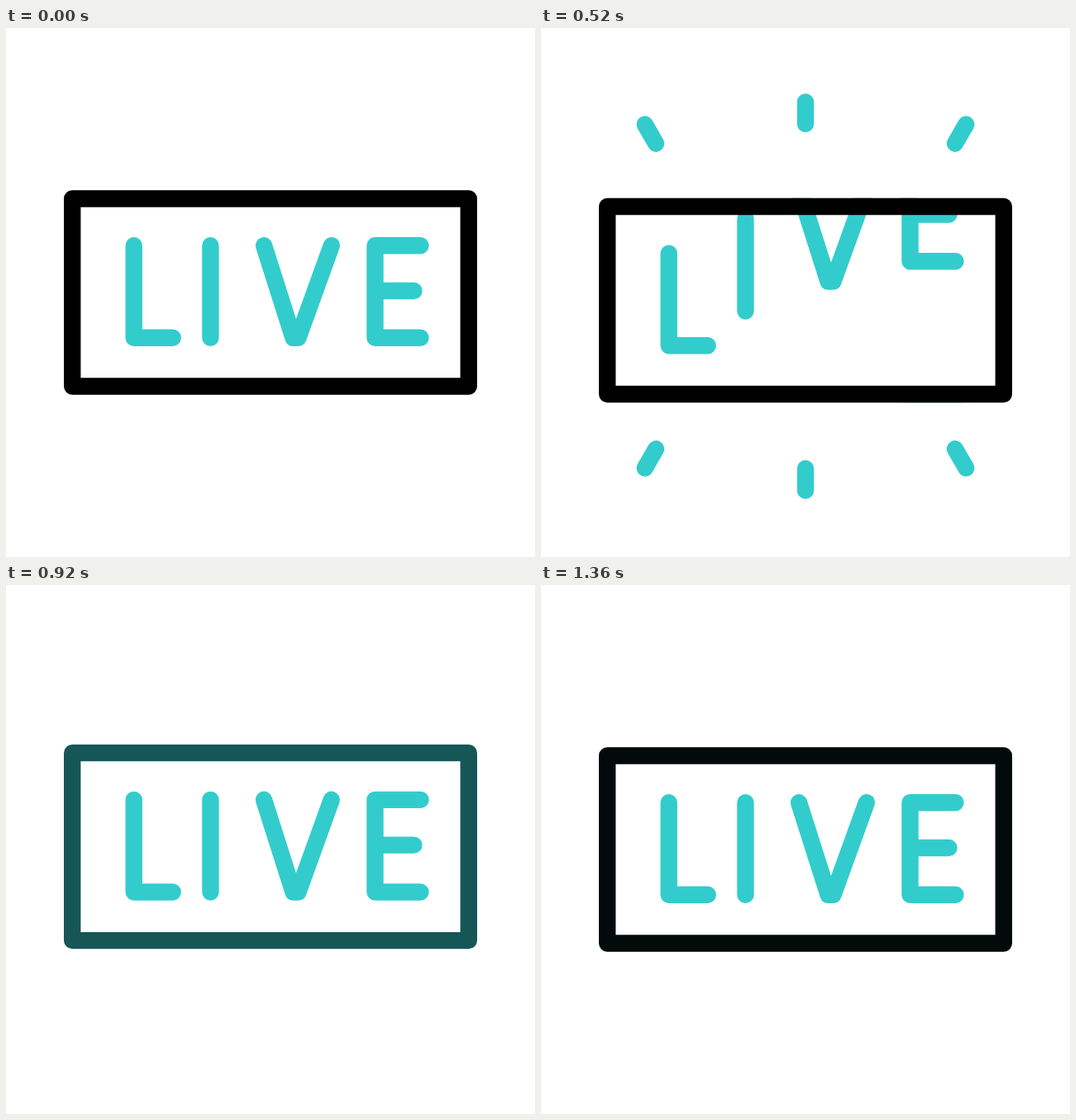
An HTML page with a canvas that plays this animation: 640 by 640 pixels, repeating every 1.48 s.

```html
<!DOCTYPE html>
<html lang="en">
<head>
<meta charset="utf-8">
<title>Live sign</title>
<style>
  html, body { margin: 0; height: 100%; overflow: hidden; background: #fff; }
  canvas { display: block; width: 100vw; height: 100vh; }
</style>
</head>
<body>
<canvas width="640" height="640"></canvas>
<script>
const ctx = document.querySelector('canvas').getContext('2d');
const LOOP = 1480, STEP = 40, LAST = 1360;
const TEAL = [51, 204, 204];
const TRAVEL = 188;

// Each letter leaves and returns at its own pace.
const letters = [
  { path: 'M154.7 263.2V374.8H201.7', out: 200, back: 200 },
  { path: 'M247.4 263.2V374.8', out: 265, back: 291 },
  { path: 'M312 263.2L347.5 374.8H353.5L393.8 263.2', out: 360, back: 360 },
  { path: 'M501.5 263.2H446.5V374.8H501.5M446.5 318H493.5', out: 440, back: 423 }
].map(l => ({ ...l, path: new Path2D(l.path) }));

// Inner end and outward direction of each ray, relative to (320, 315).
const rays = [];
for (const sy of [-1, 1]) {
  rays.push([0, sy * 194, 0, sy]);
  for (const sx of [-1, 1]) rays.push([sx * 173.7, sy * 172.2, sx * 0.5, sy * 0.866]);
}
const RAY_LENGTH = 42;

const ramp = (t, a, b) => Math.min(1, Math.max(0, (t - a) / (b - a)));
const ease = (t, a, b) => (1 - Math.cos(Math.PI * ramp(t, a, b))) / 2;

const bounce = t => 42 * ease(t, 80, 360) - 65 * ease(t, 360, 680) + 23 * ease(t, 680, 1000);
const glow = t => ramp(t, 830, 1043) - ramp(t, 1157, 1370);
const rgb = k => `rgb(${TEAL.map(c => Math.round(c * k))})`;

function drawRays(t) {
  const head = RAY_LENGTH * ease(t, 120, 560);
  const tail = RAY_LENGTH * ease(t, 360, 760);
  if (head <= tail) return;
  ctx.beginPath();
  for (const [x, y, dx, dy] of rays) {
    ctx.moveTo(320 + x + dx * tail, 315 + y + dy * tail);
    ctx.lineTo(320 + x + dx * head, 315 + y + dy * head);
  }
  ctx.stroke();
}

function drawLetter(path, shift) {
  ctx.save();
  ctx.translate(0, shift);
  ctx.stroke(path);
  ctx.restore();
}

function drawLetters(t) {
  ctx.save();
  ctx.beginPath();
  ctx.rect(70, 196.3, 500, 247.4);
  ctx.clip();
  for (const { path, out, back } of letters) {
    const leave = ease(t, 120, 120 + out);
    if (leave < 1) drawLetter(path, TRAVEL * leave);
    if (t >= 320) drawLetter(path, TRAVEL * (ease(t, 320, 320 + back) - 1));
  }
  ctx.restore();
}

function draw(t) {
  ctx.setTransform(1, 0, 0, 1, 0, 0);
  ctx.fillStyle = '#fff';
  ctx.fillRect(0, 0, 640, 640);
  ctx.translate(0, bounce(t));
  ctx.lineWidth = 20.4;
  ctx.lineCap = ctx.lineJoin = 'round';
  ctx.strokeStyle = rgb(1);
  drawRays(t);
  drawLetters(t);
  ctx.strokeStyle = rgb(glow(t));
  ctx.strokeRect(80.2, 206.5, 479.6, 227);
}

function tick() {
  const t = performance.now() % LOOP;
  draw(Math.min(LAST, Math.floor(t / STEP) * STEP));
  requestAnimationFrame(tick);
}
tick();
</script>
</body>
</html>
```
